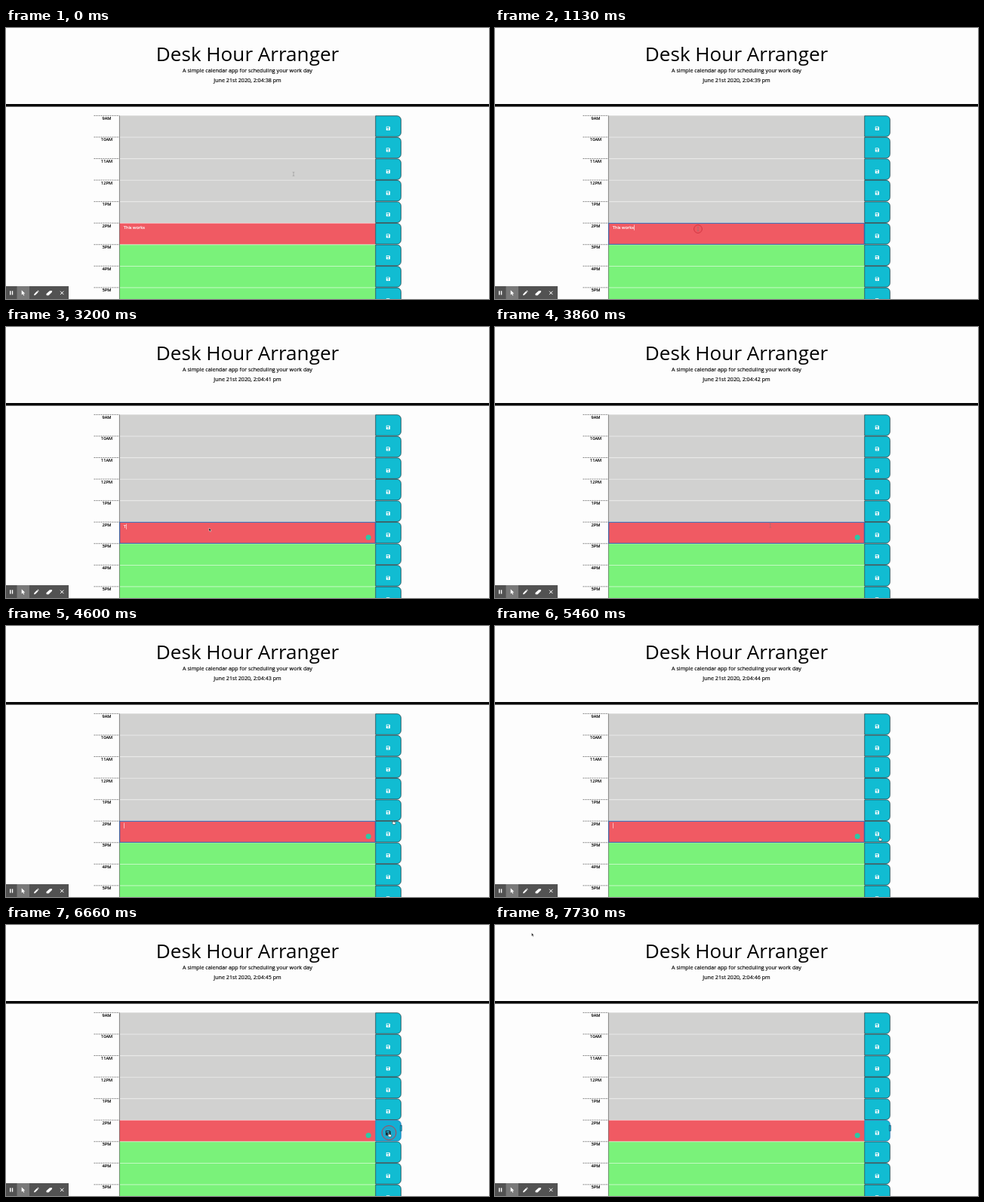
Write an HTML page that moves like this. It is 640x360 px and loops after 8000 ms.

```html
<!DOCTYPE html>
<html lang="en">
<head>
<meta charset="utf-8">
<title>Desk Hour Arranger</title>
<style>
  html, body { margin: 0; width: 100%; height: 100%; overflow: hidden; background: #fdfdfd; }
  svg { display: block; width: 640px; height: 360px; }
  text { font-family: "Open Sans", "Noto Sans", sans-serif; white-space: pre; }
</style>
</head>
<body>
<svg id="stage" viewBox="0 0 640 360" xmlns="http://www.w3.org/2000/svg"></svg>
<script>
const LOOP = 8000;
const TOP = 116.4, PITCH = 28.55, LEFT = 150.4, RIGHT = 489.6;
const NOW_ROW = 5;
const HOURS = ['9AM', '10AM', '11AM', '12PM', '1PM', '2PM', '3PM', '4PM', '5PM'];
const ENTRY = 'This works';
const CLICKS = [1060, 6660];
const stage = document.getElementById('stage');

function add(tag, attrs, parent = stage) {
  const el = document.createElementNS('http://www.w3.org/2000/svg', tag);
  for (const key in attrs) el.setAttribute(key, attrs[key]);
  parent.appendChild(el);
  return el;
}
const rect = (x, y, width, height, fill, parent) => add('rect', { x, y, width, height, fill }, parent);
const path = (d, attrs, parent) => add('path', { d, fill: 'none', ...attrs }, parent);
// A hairline stroke keeps small type as dark as it is on screen
function label(x, y, size, str, attrs) {
  const fill = '#000';
  const el = add('text', { x, y, 'font-size': size, fill, stroke: fill,
    'stroke-width': size < 10 ? .16 : 0, 'text-anchor': 'middle', ...attrs });
  el.textContent = str;
  return el;
}
const show = (el, on) => el.setAttribute('visibility', on ? 'visible' : 'hidden');

// Header
rect(0, 0, 640, 360, '#fdfdfd');
label(320, 44.2, 26.1, 'Desk Hour Arranger');
label(320, 58.8, 7.13, 'A simple calendar app for scheduling your work day');
const clock = label(320, 71.5, 7.13, '');
rect(0, 101, 640, 3.5, '#000');

// Schedule rows
const buttons = [], icons = [];
HOURS.forEach((hour, i) => {
  const y = TOP + i * PITCH;
  const fill = i < NOW_ROW ? '#d1d1d0' : i === NOW_ROW ? '#f05a63' : '#7af27a';
  path(`M116.5 ${y}H150`, { stroke: '#333', 'stroke-width': .6, 'stroke-dasharray': '2 1' });
  label(133.5, y + 5.5, 5.7, hour);
  rect(LEFT, y, RIGHT - LEFT, PITCH, fill);
  if (i) path(`M${LEFT} ${y + .2}H${RIGHT}`, { stroke: '#fff', 'stroke-width': .45 });
  buttons.push(path(`M489.7 ${y + .3}h28.4a5.3 5.3 0 0 1 5.3 5.3v17a5.3 5.3 0 0 1 -5.3 5.3h-28.4z`,
    { fill: '#11bcd2', stroke: '#1a3338', 'stroke-width': .7 }));
  const icon = add('g', {});
  path('M-2.5 -2a.5 .5 0 0 1 .5 -.5h3.5l1 1v3.5a.5 .5 0 0 1 -.5 .5h-4a.5 .5 0 0 1 -.5 -.5z'
    + 'M-1.8 -1.8v1.4h3v-1.4zM-.8 1a.8 .8 0 1 0 1.6 0a.8 .8 0 1 0 -1.6 0z',
    { fill: 'currentColor', 'fill-rule': 'evenodd' }, icon);
  icons.push(icon);
});
function styleIcon(i, scale, color) {
  icons[i].setAttribute('transform', `translate(506.4 ${TOP + i * PITCH + 17}) scale(${scale})`);
  icons[i].style.color = color;
}
HOURS.forEach((_, i) => styleIcon(i, 1.05, '#fff'));
path(`M150.4 ${TOP}V360`, { stroke: '#222', 'stroke-width': .5 });

// Active entry
const rowY = TOP + NOW_ROW * PITCH;
const entry = label(155.8, rowY + 8.2, 5.7, '', { fill: '#fff', stroke: '#fff', 'text-anchor': 'start' });
const caret = rect(0, rowY + 2.4, .6, 7.2, '#fff');
const focusBox = add('rect', { x: LEFT + .3, y: rowY + .2, width: RIGHT - LEFT - .6, height: PITCH - .6,
  fill: 'none', stroke: '#2a66b4', 'stroke-width': 1 });
const badge = add('circle', { cx: 480.2, cy: 279.6, r: 3.5, fill: '#2cc9a6' });
const focusMark = add('rect', { x: 522.6, y: 266.2, width: 1.8, height: 7.4,
  fill: '#11bcd2', stroke: '#264a70', 'stroke-width': .7 });

// Recorder toolbar
rect(0, 343, 83, 17, '#525252');
rect(14.5, 343, 16.5, 17, '#797979');
rect(5, 349.3, 1.4, 5.2, '#fff');
rect(7.8, 349.3, 1.4, 5.2, '#fff');
path('M20.7 348.3v6.2l1.5 -1.3l1.1 2.4l1 -.5l-1.1 -2.3h2z', { fill: '#fff' });
path('M37 355.2l.5 -2l3.7 -3.7l1.5 1.5l-3.7 3.7zM41.6 349.1l.7 -.7l1.5 1.5l-.7 .7z', { fill: '#fff' });
path('M53.3 353.3l4.8 -4.2h3l-.2 2l-4.5 4.2h-2.6z', { fill: '#fff' });
path('M72 349.7l4.4 4.4m0 -4.4l-4.4 4.4', { stroke: '#fff', 'stroke-width': 1 });

// Pointers, hot spot at the origin
const ring = add('circle', { fill: '#e0303a', 'fill-opacity': .06, stroke: '#cf3440', 'stroke-width': .9 });
const pointers = { beam: add('g', {}), arrow: add('g', {}), hand: add('g', {}) };
path('M-1.3 -2.6q1.3 0 1.3 .7q0 -.7 1.3 -.7M0 -2v4M-1.3 2.6q1.3 0 1.3 -.7q0 .7 1.3 .7',
  { stroke: '#777', 'stroke-width': .4 }, pointers.beam);
path('M0 0v4.3l1 -.9l.8 1.7l.8 -.4l-.8 -1.6h1.4z',
  { fill: '#111', stroke: '#fff', 'stroke-width': .4 }, pointers.arrow);
path('M-.5 .4q.5 -.7 1 0v1.7l2.3 .5q.5 .2 .4 .8l-.5 2.2h-2.6l-1.9 -2.3q0 -.8 1.3 -.1z',
  { fill: '#fff', stroke: '#222', 'stroke-width': .5 }, pointers.hand);

const TRACK = [
  [60, 381, 194], [840, 269, 267], [3560, 269, 267], [4260, 511, 259],
  [4400, 513, 258], [4640, 513, 258], [5400, 509.5, 280], [5600, 509.5, 280],
  [6300, 507.5, 276], [7130, 507.5, 276], [7730, 48.5, 10.5]
];
function pointerAt(t) {
  const next = TRACK.findIndex(p => p[0] > t);
  if (next === 0) return TRACK[0].slice(1);
  if (next < 0) return TRACK[TRACK.length - 1].slice(1);
  const [t0, x0, y0] = TRACK[next - 1], [t1, x1, y1] = TRACK[next];
  const u = (t - t0) / (t1 - t0), k = u * u * (3 - 2 * u);
  return [x0 + (x1 - x0) * k, y0 + (y1 - y0) * k];
}
function pointerKind(x, y, t) {
  if (y < TOP || x < LEFT || x > 524) return 'arrow';
  if (x > RIGHT) return 'hand';
  return t > 1700 && t < 3560 ? 'arrow' : 'beam';
}

function draw(t) {
  clock.textContent = `June 21st 2020, 2:04:${38 + Math.floor((t + 600) / 1000)} pm`;

  // Typing: one letter removed every 160 ms
  const gone = Math.min(ENTRY.length, Math.max(0, Math.floor((t - 1700) / 160)));
  entry.textContent = ENTRY.slice(0, ENTRY.length - gone);
  const editing = t >= CLICKS[0] && t < CLICKS[1];
  const typing = t >= 1700 && t < 3300;
  const blinkStart = t < 1700 ? CLICKS[0] : 3300;
  caret.setAttribute('x', 156 + (gone < ENTRY.length ? entry.getComputedTextLength() : 0));
  show(caret, editing && (typing || (t - blinkStart) % 1000 < 500));
  show(focusBox, editing);
  show(badge, t >= 1500);

  const saved = t >= CLICKS[1];
  const [x, y] = pointerAt(t);
  const onIcon = t > 5600 && Math.abs(x - 506.4) < 4 && Math.abs(y - rowY - 17) < 3.5;
  styleIcon(NOW_ROW, onIcon ? 1.3 : 1.05, onIcon ? '#15222a' : '#fff');
  const button = buttons[NOW_ROW];
  button.setAttribute('fill', saved && onIcon ? '#12afd5' : '#11bcd2');
  button.setAttribute('stroke', saved ? '#1c66a8' : '#1a3338');
  show(focusMark, saved);

  const kind = pointerKind(x, y, t);
  for (const name in pointers) {
    show(pointers[name], name === kind);
    pointers[name].setAttribute('transform', `translate(${x} ${y})`);
  }

  // Click ring shrinks in two hard steps
  const since = Math.min(...CLICKS.map(c => t < c ? Infinity : t - c));
  show(ring, since < 140);
  ring.setAttribute('cx', x);
  ring.setAttribute('cy', y);
  ring.setAttribute('r', since < 70 ? 9.5 : 5.4);
}

const start = performance.now();
function tick() {
  draw((performance.now() - start) % LOOP);
  requestAnimationFrame(tick);
}
tick();
</script>
</body>
</html>
```
